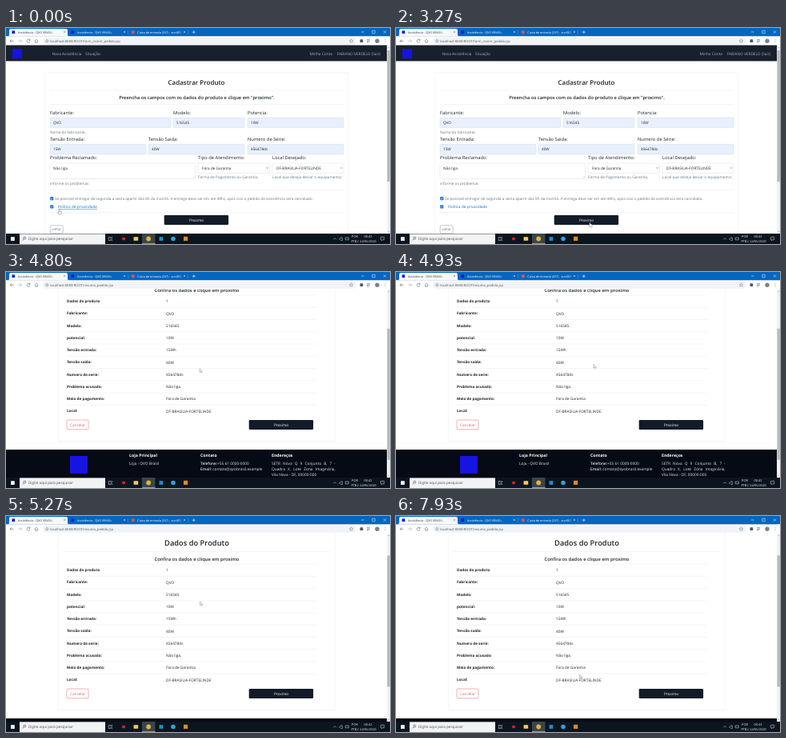
These frames come from a looping animation (480x270 px, 8000 ms). An HTML page:

```html
<!DOCTYPE html>
<html lang="pt-BR">
<head>
<meta charset="utf-8">
<title>Assistência</title>
<style>
html, body { margin: 0; width: 100%; height: 100%; overflow: hidden; background: #fff; }
svg { display: block; width: 100%; height: 100%; font-family: "Open Sans", "Noto Sans", sans-serif; text-rendering: geometricPrecision; }
</style>
</head>
<body>
<svg id="stage" viewBox="0 0 480 270"></svg>
<script>
const LOOP = 8000, INK = '#212529', GREY = '#6c757d', LINE = '#e3e6e9', PALE = '#a9aeb6';
const BRAND = 'QVO', LOCAL = 'DF-BRASILIA-FORTELINDE';

// y is the vertical middle of the line
const text = (x, y, str, size = 4.7, fill = INK, extra = '') =>
  `<text x="${x}" y="${(y + size * .35).toFixed(2)}" font-size="${size}" fill="${fill}" ${extra}>${str}</text>`;
const rect = (x, y, w, h, fill, extra = '') =>
  `<rect x="${x}" y="${y}" width="${w}" height="${h}" fill="${fill}" ${extra}/>`;
const dot = (x, y, r, fill) => `<circle cx="${x}" cy="${y}" r="${r}" fill="${fill}"/>`;
const path = (d, stroke, w = .6, fill = 'none') =>
  `<path d="${d}" fill="${fill}" stroke="${stroke}" stroke-width="${w}"/>`;
const rule = (x1, x2, y) => path(`M${x1} ${y}H${x2}`, LINE, .4);
const mid = ' text-anchor="middle"', end = ' text-anchor="end"';
const semi = ' font-weight="600"', bold = ' font-weight="700"';
const box = (x, y, w, h, fill, stroke = '#ced4da') =>
  rect(x, y, w, h, fill, `rx="1.4" stroke="${stroke}" stroke-width=".4"`);
const field = (x, y, w, str) => box(x, y, w, 12.6, '#e8f0fe') + text(x + 4, y + 6.4, str);
const label = (x, y, str) => text(x, y, str, 5.8);
const help = (x, y, str) => text(x, y, str, 4.7, GREY);
const select = (x, w, str) => box(x, 169, w, 12.4, '#fff') + text(x + 5, 175.2, str) +
  path(`M${x + w - 4} 174.3l1.1 1.2 1.1-1.2`, '#343a40', .5);
const button = (x, y) => rect(x - .3, y, 80.4, 12, '#131b29', 'rx="1.2"') +
  text(x + 40, y + 6, 'Proximo', 4.7, '#fff', mid);
const check = y => rect(55.2, y, 4.2, 4.2, '#1a73e8', 'rx=".7"') +
  path(`M56.1 ${y + 2.2}l.9.9 1.6-2`, '#fff', .55);

const navbar = rect(0, 21, 476.3, 20.4, '#18202d') + rect(8, 26, 12, 12, '#1713e0') +
  text(57.5, 32, 'Nova Assistência', 4.75, PALE) + text(99, 32, 'Situação', 4.75, PALE) +
  text(408, 32, 'Minha Conta', 4.8, PALE, end) + text(468, 32, 'FABIANO VERDELO (Sair)', 4.75, PALE, end);

const formPage = navbar + box(48.3, 55.3, 379.5, 240, '#fff', LINE) +
  text(238, 68, 'Cadastrar Produto', 8, INK, mid + semi) + rule(55, 422, 78) +
  text(238.5, 87, 'Preencha os campos com os dados do produto e clique em "proximo".', 5.8, INK, mid + semi) +
  rule(55, 422, 95.5) +
  label(55, 105.5, 'Fabricante:') + label(209, 105.5, 'Modelo:') + label(302, 105.5, 'Potencia:') +
  field(55, 112, 151, BRAND) + field(209, 112, 89, '516545') + field(302, 112, 120, '10W') +
  help(55, 130, 'Nome do fabricante.') +
  label(55, 138.7, 'Tensão Entrada:') + label(178, 138.7, 'Tensão Saida:') + label(302, 138.7, 'Numero de Série:') +
  field(55, 145.3, 120, '15W') + field(178, 145.3, 120, '40W') + field(302, 145.3, 120, '456478ds') +
  label(55, 162, 'Problema Reclamado:') + label(240, 162, 'Tipo de Atendimento:') + label(333, 162, 'Local Desejado:') +
  box(55, 169, 181.5, 19.5, '#fff') + text(59, 175.2, 'Não liga.') +
  path('M233.2 187.5l2.4-2.4M234.7 187.5l.9-.9', '#888', .3) +
  select(240, 89.5, 'Fora de Garantia') + select(333, 89, LOCAL) +
  help(55, 194, 'informe os problemas') + help(240, 186.3, 'Forma de Pagamento ou Garantia;') +
  help(333, 186.3, 'Local que deseja deixar o equipamento;') + rule(55, 422, 202.5) +
  check(211) + help(61, 213.2, 'Se possivel entregar de segunda a sexta apartir das 8h da manhã. A entrega deve ser em ate 48hs, apos isso o pedido de assistência sera cancelado.') +
  check(221.2) + text(65, 223.5, 'Politica de privacidade', 4.7, '#0a6fd6', 'id="link"') + rule(55, 422, 230.5) +
  button(198, 234) + box(55.2, 246.8, 16, 10, '#fff', GREY) + text(63.2, 251.8, 'voltar', 4.5, GREY, mid);

const rows = [['Dados do produto', '1'], ['Fabricante:', BRAND], ['Modelo:', '516545'], ['potencial:', '10W'],
  ['Tensão entrada:', '15Wh'], ['Tensão saida:', '40W'], ['Numero de serie:', '456478ds'],
  ['Problema acusado:', 'Não liga.'], ['Meio de pagamento:', 'Fora de Garantia'], ['Local:', LOCAL]];
const foot = (x, y, str, extra = '') => text(x, y, str, 4.8, '#e9ebee', extra);
const footHead = (x, str) => text(x, 291, str, 5.2, '#fff', bold);
const footer = rect(0, 284, 476.3, 85, '#050a14') + rect(80, 292, 22, 22, '#1713e0') +
  footHead(154, 'Loja Principal') + foot(154, 301.3, `Loja - ${BRAND} Brasil`) +
  footHead(243, 'Contato') +
  foot(243, 301, '<tspan font-weight="600">Telefone:</tspan>+55 61 0000-0000') +
  foot(243, 308.3, '<tspan font-weight="600">Email:</tspan> contato@qvobrasil.example') +
  footHead(332, 'Endereços') +
  foot(332, 301, 'SETR Nova Q 9 Conjunto B, 7 -', 'word-spacing="1.9"') +
  foot(332, 308.3, 'Quadra X, Lote Zona Imaginária,', 'word-spacing="2"') +
  foot(332, 315.6, 'Vila Nova - DF, 00000-000');
const summaryPage = navbar + box(65.3, 50.3, 346, 223.5, '#fff', LINE) +
  text(238.5, 64.3, 'Dados do Produto', 9.3, INK, mid + semi) + rule(71, 405, 75.5) +
  text(238.5, 84.5, 'Confira os dados e clique em proximo', 5.85, INK, mid + semi) +
  rows.map(([name, value], i) => {
    const y = 98.6 + i * 15.25;
    return rule(76, 388, y - 7.6) + text(76, y, name, 4.65, INK, bold) + text(200, y, value, 4.75);
  }).join('') +
  box(76, 247, 27, 11.8, '#fff', '#dc3545') + text(89.5, 253, 'Cancelar', 4.7, '#d9606c', mid) +
  button(304, 247) + footer;

const cross = (x, y, r, c) => path(`M${x - r} ${y - r}l${2 * r} ${2 * r}m0 ${-2 * r}l${-2 * r} ${2 * r}`, c, .5);
const tab = (x, str, ink, icon) => rect(x, 3.4, 3.6, 3.6, icon) + text(x + 7.3, 5.2, str, 3.75, ink);
const title = `Assistência - ${BRAND} BRASIL`;
const browser = rect(0, 0, 480, 10.5, '#0566c0') +
  path('M2 10.5Q4 10.5 4 8V3Q4 1 6 1H75Q77 1 77 3V8Q77 10.5 79 10.5Z', 'none', 0, '#f6f8fb') +
  tab(7.5, title, '#3c4043', '#1713e0') + cross(73, 5, .9, '#5f6368') +
  tab(81.5, title, '#fff', '#1713e0') + cross(148, 5, .9, '#fff') +
  `<clipPath id="cut"><path d="M155 0h64v11h-64z"/></clipPath><g clip-path="url(#cut)">` +
  tab(157, 'Caixa de entrada (257) - zun00123', '#fff', '#e5554a') + '</g>' + cross(223, 5, .9, '#fff') +
  path('M152.5 3v5M227.5 3v5', '#7fb0df', .4) + path('M232.8 5.2h4M234.8 3.2v4', '#fff') +
  path('M444 5h3.6M457.8 3.3h3.4v3.4h-3.4z', '#fff', .5) + cross(473.5, 5, 1.6, '#fff') +
  rect(0, 10.5, 480, 11, '#fff') + rect(46, 11.8, 392, 9, '#f1f3f4', 'rx="4.5"') +
  path('M9.5 16.2h-4.5m2-2l-2 2 2 2', '#5f6368') + path('M15 16.2h4.5m-2-2l2 2-2 2', '#aab') +
  path('M29.7 15a2 2 0 1 0 .2 2M30 13.6v1.8h-1.8', '#5f6368') +
  path('M36 16.2l2-2 2 2M36.7 16v2.2h2.6V16', '#5f6368') +
  path('M53 16.2a1.7 1.7 0 1 0-3.4 0a1.7 1.7 0 1 0 3.4 0M51.3 15.9v1.2M51.3 15v.4', '#5f6368', .45) +
  text(55.3, 16.2, '', 4.13, '#54585d', 'id="url"') +
  path('M431.5 13.8l.7 1.6 1.7.1-1.3 1.1.4 1.7-1.5-.9-1.5.9.4-1.7-1.3-1.1 1.7-.1z', '#5f6368', .4) +
  rect(442.5, 14.3, 3.8, 3.8, '#50565d', 'rx=".6"') + path('M451 14.7h4M451 16.3h4M451 17.9h2.5', '#50565d') +
  dot(464, 16.2, 2.7, '#7c8288') + [14.5, 16.2, 17.9].map(y => dot(474, y, .45, '#5f6368')).join('') +
  rect(476.3, 21.5, 3.7, 236, '#f1f1f1') + path('M477.5 25l.7-1 .7 1M477.5 254l.7 1 .7-1', '#777', .4) +
  rect(476.5, 28, 3.3, 164, '#b8b8b8', 'id="thumb"');

const tray = (x, y, str, extra = '') => text(x, y, str, 3.9, '#f1f3f5', mid + extra);
const taskbar = rect(0, 257, 480, 13, '#0b151f') + rect(6, 261.2, 4.8, 4.8, '#f4f6f8') +
  rect(17, 257.4, 107, 12.6, '#f2f3f4') +
  path('M24.7 262.6a1.4 1.4 0 1 0-2.8 0a1.4 1.4 0 1 0 2.8 0M22.3 263.7l-1.5 1.7', '#333') +
  text(28, 263.6, 'Digite aqui para pesquisar', 4.6, '#4b4f54') +
  path('M128.3 261.5h2.8v4h-2.8zM132.5 261v2M132.5 264v2', '#e8ebee', .5) +
  rect(170, 257, 16.5, 13, '#38444e') + rect(170, 269.2, 16.5, .8, '#76b9ed') +
  dot(147, 263.5, 2.1, '#d81e28') + rect(159.6, 261.2, 5.6, 4.6, '#f5cb57') +
  dot(178.2, 263.5, 2.9, '#e6b52f') + rect(191.5, 261.1, 4.8, 4.8, '#1f8ad2') +
  dot(209, 263.5, 2.8, '#2ca5e0') + rect(222, 260.8, 5.2, 5.2, '#dc8b22') +
  path('M409.5 264.4l1.7-1.7 1.7 1.7M417 265v-2h1.3M418.3 265.5h2v-3.6h-2M424.3 262h4v2.8h-4z', '#e8ebee', .5) +
  tray(436, 261, 'POR') + tray(436, 267, 'PTB2') + tray(452.5, 261, '', ' id="clock"') +
  tray(452.5, 267, '24/06/2020') + path('M468.5 261.3h4.2v3.5h-2.2l-1 1v-1h-1z', '#e8ebee', .5);

const cursors = {
  arrow: path('M0 0V4.6L1.1 3.7 1.8 5.2 2.5 4.9 1.9 3.4H3.3Z', '#555', .35, '#fff'),
  hand: path('M-.6 3.2V.4Q0-.4.6.4V2L2.7 2.6V4.2L2.1 6H-.4L-1.8 3.8Q-1.5 2.8-.6 3.6Z', '#333', .35, '#fff'),
  beam: path('M-1-2.6Q0-2.6 0-2Q0-2.6 1-2.6M0-2.2V2.2M-1 2.6Q0 2.6 0 2Q0 2.6 1 2.6', '#222', .5)
};

const $ = id => document.getElementById(id);
$('stage').innerHTML = rect(0, 0, 480, 270, '#fff') + `<g id="form">${formPage}</g><g id="summary">${summaryPage}</g>` +
  browser + taskbar + '<g id="cursor">' +
  Object.entries(cursors).map(([id, art]) => `<g id="${id}">${art}</g>`).join('') + '</g>';

const mouse = [[0, 66.5, 227], [70, 66.5, 227], [530, 249, 243], [730, 249, 243], [800, 244, 242], [1540, 244, 242],
  [1600, 245, 242], [1740, 245, 242], [1930, 290, 185], [2070, 290.5, 186], [2330, 291, 179], [2470, 291, 179],
  [2930, 246, 243], [3070, 246, 243], [3130, 242.5, 243], [3530, 242.5, 243], [4070, 187.5, 180.5],
  [4330, 187.5, 180.5], [4900, 247, 115.5], [5000, 247, 115.5], [5270, 242.5, 107], [5700, 257, 90],
  [6000, 250, 60], [6600, 91, 209], [7000, 91, 66], [7500, 224, 190], [7800, 229.5, 198], [8000, 229.5, 198]];
const scroll = [[0, 0], [4330, 0], [4530, 31], [4600, 31], [4800, 62], [5000, 62], [5200, 31], [8000, 31]];

function track(keys, t) {
  const i = keys.findIndex(k => k[0] > t), a = keys[i - 1], b = keys[i];
  const p = (t - a[0]) / (b[0] - a[0]), e = p * p * (3 - 2 * p);
  return a.slice(1).map((v, n) => v + (b[n + 1] - v) * e);
}
const show = (id, on) => $(id).setAttribute('display', on ? 'inline' : 'none');

function draw(now) {
  const t = now % LOOP, first = t < 3530;
  const [x, y] = track(mouse, t), [top] = track(scroll, t);
  const over = (x1, y1, x2, y2) => first && x > x1 && x < x2 && y > y1 && y < y2;
  const onLink = over(64, 220, 115, 228), onButton = over(198, 234, 278, 246);
  const kind = onLink || onButton ? 'hand' : over(240, 183, 315, 189) ? 'beam' : 'arrow';

  show('form', first);
  show('summary', !first);
  $('summary').setAttribute('transform', `translate(0 ${-top})`);
  $('thumb').setAttribute('y', 28 + top * .69);
  $('link').setAttribute('text-decoration', onLink ? 'underline' : 'none');
  $('url').textContent = `localhost:8080/ROOT/${first ? 'form_inserir' : 'resumo'}_pedido.jsp`;
  $('clock').textContent = t < 7000 ? '00:42' : '00:43';
  $('cursor').setAttribute('transform', `translate(${x} ${y})`);
  for (const id in cursors) show(id, id === kind);
}
let start;
function tick(now) {
  start ??= now;
  draw(now - start);
  requestAnimationFrame(tick);
}
draw(0);
requestAnimationFrame(tick);
</script>
</body>
</html>
```
